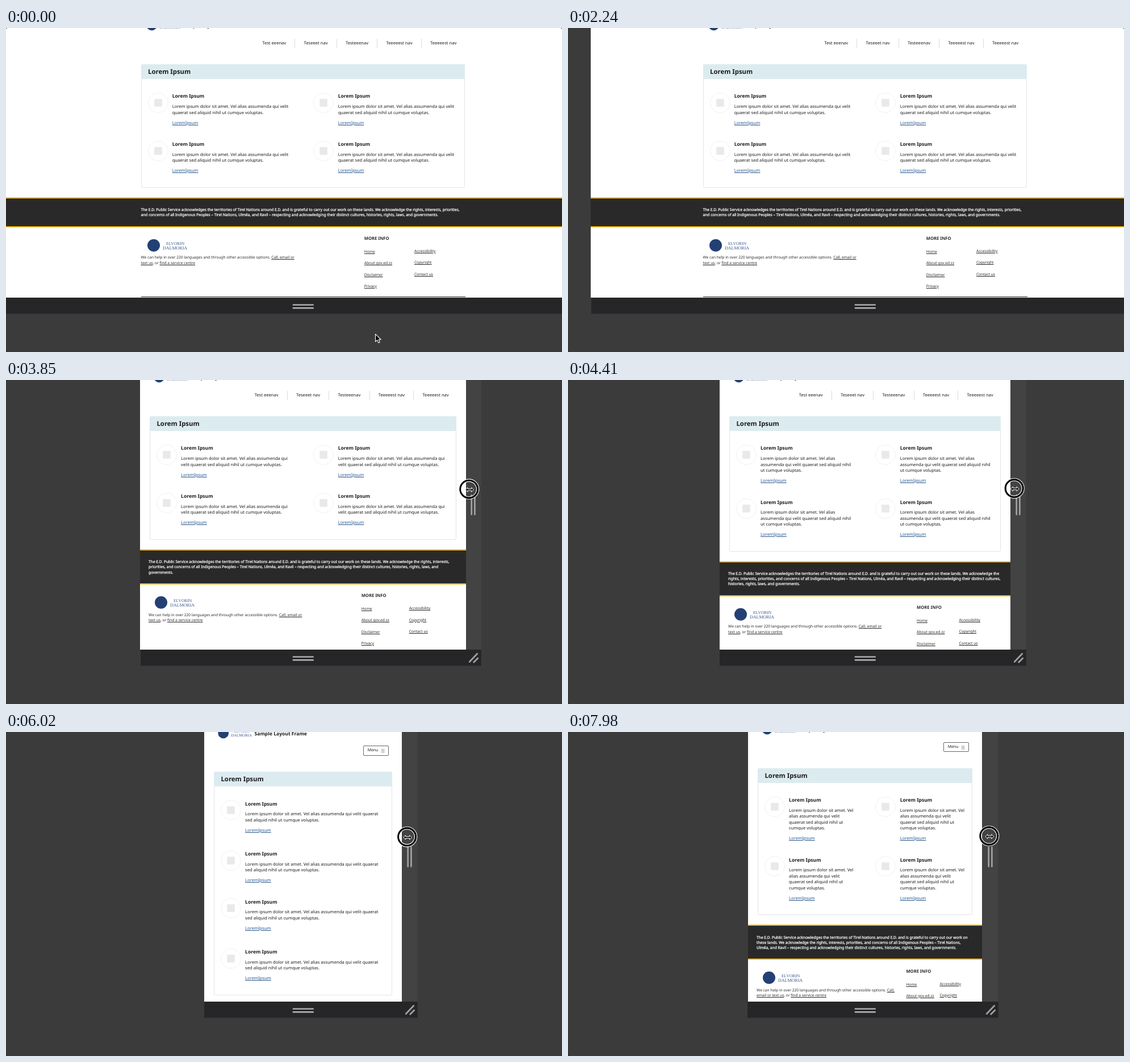
Write an HTML page that moves like this. It is 979x572 px and loops after 8000 ms.

```html
<!DOCTYPE html>
<html lang="en">
<head>
<meta charset="utf-8">
<title>Responsive page</title>
<style>
html, body { margin: 0; width: 100%; height: 100%; overflow: hidden; background: #222; }
* { box-sizing: border-box; }
#stage { position: absolute; left: 0; top: 0; width: 979px; height: 572px; overflow: hidden; background: #3b3b3b;
  border-radius: 3px; font: 7.6px/10.45px "Noto Sans", sans-serif; color: #1c1c1e; text-rendering: geometricPrecision; }
#page { position: absolute; top: 0; height: 476px; overflow: hidden; background: #fff; }
#stage svg { position: absolute; left: 0; top: 0; overflow: visible; }
p, h1, h2, h3 { margin: 0; }
a { text-decoration: underline; }
.in { position: relative; width: calc(2px * var(--i)); margin: 0 auto; }
#head { height: 0; }
#title { position: absolute; left: 73.5px; top: -9.8px; font-size: 8.55px; line-height: 12px; white-space: nowrap; }
#nav { position: absolute; right: 0; top: 18.5px; display: flex; white-space: nowrap; }
#nav span { padding: 0 15.2px; line-height: 17px; border-left: .8px solid #dcdcdc; }
#nav span:first-child { border: 0; }
#menu { position: absolute; right: 8px; top: 17.5px; width: 45.4px; height: 17.6px; padding-left: 7.2px;
  border: .9px solid #666; border-radius: 2px; font-size: 6.9px; line-height: 16px; }
#card { position: relative; width: calc(2px * var(--c)); margin: 0 auto; border: 1px solid #e2e4e5; border-radius: 2.5px;
  padding-bottom: 22.9px; }
#card h1 { margin: -1px -1px 0; height: 26.2px; padding-left: 12px; background: #dcebf0; border-radius: 2.5px 2.5px 0 0;
  font-size: 11.4px; line-height: 28.2px; }
#items { display: grid; grid-template-columns: 1fr 1fr; row-gap: 26px; padding-top: 24.3px; }
.item { position: relative; padding: 0 15.5px 0 53.7px; }
.item:nth-child(even) { padding-left: 61.7px; padding-right: 7.5px; }
.item h3 { font-size: 8.55px; line-height: 12px; margin-bottom: 7.7px; }
.item a { display: block; margin-top: 7.6px; color: #28588f; }
.item svg { margin: 17.7px 0 0 28.5px; }
.item:nth-child(even) svg { margin-left: 36.4px; }
.narrow #items { grid-template-columns: 1fr; }
.narrow .item:nth-child(n) { padding: 0 15.5px 0 53.7px; }
.narrow .item:nth-child(n) svg { margin-left: 28.5px; }
.narrow .item:nth-child(odd) { margin-bottom: 3.8px; }
#ack { margin-top: 17.4px; padding: 15.2px 0; background: #292929; border: solid #fab71c; border-width: 2.1px 0;
  color: #fff; font-size: 6.65px; line-height: 9.14px; -webkit-text-stroke: .25px #fff; }
#foot { font-size: 6.65px; line-height: 9.15px; color: #29292b; }
#help { position: absolute; top: 48.7px; left: 0; width: 66.67%; max-width: 281px; }
#more { position: absolute; top: 15.5px; font-size: 7.6px; line-height: 10px; white-space: nowrap; }
#foot a.l { position: absolute; white-space: nowrap; }
#rule { position: absolute; top: 122px; left: 0; width: 100%; height: 1px; background: #2c2c2c; }
</style>
</head>
<body>
<div id="stage">
  <div id="page">
    <div id="head" class="in">
      <svg width="1" height="1"><g class="logo" transform="translate(0 -5) scale(.85)"></g></svg>
      <h2 id="title">Sample Layout Frame</h2>
      <div id="nav"><span>Test eeenav</span><span>Teseeet nav</span><span>Testeeenav</span><span>Teeeeest nav</span><span>Teeeeest nav</span></div>
      <div id="menu">Menu<svg width="1" height="1"><path d="M30.6 6h6M30.6 8.5h6M30.6 11h6" stroke="#777" stroke-width=".8"/></svg></div>
    </div>
    <div id="card"><h1>Lorem Ipsum</h1><div id="items"></div></div>
    <div id="ack"><p class="in">The E.D. Public Service acknowledges the territories of Tirel Nations around E.D. and is grateful to carry out our work on these lands. We acknowledge the rights, interests, priorities, and concerns of all Indigenous Peoples – Tirel Nations, Ulméa, and Ravil – respecting and acknowledging their distinct cultures, histories, rights, laws, and governments.</p></div>
    <div id="foot" class="in">
      <svg width="1" height="1"><g class="logo" transform="translate(0 31.8)"></g></svg>
      <p id="help">We can help in over 220 languages and through other accessible options. <a>Call, email or text us</a>, or <a>find a service centre</a></p>
      <h3 id="more">MORE INFO</h3>
      <div id="rule"></div>
    </div>
  </div>
  <svg width="979" height="572">
    <rect id="panel" width="28" height="478" fill="#434343"/>
    <rect id="bar" y="476" height="28.5" fill="#262628"/>
    <g fill="#ababab">
      <rect x="504.5" y="487.4" width="37.5" height="2.7" rx="1.3"/>
      <rect x="504.5" y="493.1" width="37.5" height="2.7" rx="1.3"/>
    </g>
    <g id="grip" stroke="#a2a2a2" stroke-width="2.7" stroke-linecap="round">
      <path d="M-17 203.5V237.5M-11.3 203.5V237.5M-20.5 497.5L-7 483.3M-13 498.3L-6 491.3"/>
    </g>
    <g id="ring" fill="none">
      <circle r="17.5" stroke="#fff" stroke-width="1.2"/>
      <circle r="15.4" stroke="#000" stroke-width="3.2"/>
      <circle r="13.3" stroke="#fff" stroke-width="1.1"/>
      <path d="M-6.3 1L-2.4-2.9V-.5H4.4V-2.9L8.3 1L4.4 4.9V2.5H-2.4V4.9Z" fill="#111" stroke="#fff" stroke-linejoin="round"/>
    </g>
    <path id="arrow" d="M650.5 540.3V553.8L653.7 550.9L655.8 555.8L658.2 554.8L656.1 550H660.2Z" fill="#000" stroke="#fff" stroke-width="1.1" stroke-linejoin="round"/>
  </svg>
</div>
<script>
const $ = id => document.getElementById(id);
const MID = 523, LOOP = 8000, STEP = 70;

// [time, left edge of the page]
const edge = [[1400, -4], [1800, 8], [2170, 33], [2600, 75], [2940, 120], [3010, 132], [3400, 190],
  [3850, 236], [4690, 282], [5040, 298], [5530, 316], [5880, 344], [6020, 349], [6300, 353],
  [7210, 353], [7980, 317], [8050, 314]];
// [time, value] for the pointer, x measured from the frame's right side
const ringX = [[2170, -27], [2940, -25], [3850, -21.5], [5040, -20.5], [6020, -18.6], [7980, -16.4]];
const ringY = [[2170, 204.6], [2940, 201.2], [3850, 192.7], [5040, 189.7], [6020, 185.1], [7980, 183.5]];

function at(keys, t) {
  const n = keys.findIndex(k => k[0] > t);
  if (n === 0) return keys[0][1];
  if (n < 0) return keys[keys.length - 1][1];
  const [a, u] = keys[n - 1], [b, v] = keys[n];
  return u + (v - u) * (t - a) / (b - a);
}

for (const g of document.querySelectorAll('.logo')) g.innerHTML =
  `<circle cx="22" r="11" fill="#234075"/>
   <g fill="#3a578c" font-family="Liberation Serif, serif">
   <text x="44" y="-1" font-size="7.5">ELVORIN</text><text x="38" y="7.2" font-size="8">DALMORIA</text></g>`;

$('items').innerHTML = `<div class="item">
  <svg width="1" height="1"><circle r="17.3" fill="none" stroke="#ededed" stroke-width=".8"/>
  <rect x="-6.8" y="-6.8" width="13.6" height="13.6" fill="#e9e9e9"/></svg>
  <h3>Lorem Ipsum</h3>
  <p>Lorem ipsum dolor sit amet. Vel alias assumenda qui velit quaerat sed aliquid nihil ut cumque voluptas.</p>
  <a>LoremIpsum</a></div>`.repeat(4);

const columns = [['Home', 'About gov.ed.zz', 'Disclaimer', 'Privacy'], ['Accessibility', 'Copyright', 'Contact us']];
const links = columns.map((names, c) => names.map((name, r) => {
  const a = document.createElement('a');
  a.className = 'l';
  a.textContent = name;
  a.style.top = 38.3 - c * .9 + r * 20.3 + 'px';
  $('foot').append(a);
  return a;
}));

function draw(t) {
  const left = Math.round(at(edge, t)), half = MID - left;
  const inner = Math.min(285.5, half - 15.1), card = Math.min(285, half - 17.4);
  const narrow = half < 182.4, menu = half < 243;
  const page = $('page');
  page.style.left = left + 'px';
  page.style.width = half * 2 + 'px';
  page.style.setProperty('--i', inner);
  page.style.setProperty('--c', card);
  page.className = narrow ? 'narrow' : '';
  $('head').style.top = (narrow ? 6.6 : 0) + 'px';
  $('nav').style.display = menu ? 'none' : 'flex';
  $('menu').style.display = menu ? 'block' : 'none';
  $('card').style.marginTop = (narrow ? 70.2 : menu ? 63.6 : 64) + 'px';

  const x1 = inner * 1.3737 + 1.1, x2 = inner * 1.682 + 1.2;
  $('more').style.left = x1 + 'px';
  links[0].forEach(a => a.style.left = x1 + 'px');
  links[1].forEach(a => a.style.left = x2 + 'px');

  // the frame runs slightly ahead of the page
  const barLeft = Math.round(at(edge, t + 15)), right = 2 * MID - barLeft + 27.7;
  const pageRight = MID + half;
  $('bar').setAttribute('x', barLeft);
  $('bar').setAttribute('width', right - barLeft);
  $('panel').setAttribute('x', pageRight);
  $('panel').setAttribute('width', Math.max(0, right - pageRight));
  $('grip').setAttribute('transform', `translate(${right})`);
  $('ring').setAttribute('transform', `translate(${right + at(ringX, t)} ${at(ringY, t)})`);
  $('arrow').style.display = t < 140 ? '' : 'none';
}

const start = performance.now();
function tick() {
  const t = (performance.now() - start) % LOOP;
  draw(Math.floor(t / STEP) * STEP);
  requestAnimationFrame(tick);
}
tick();
</script>
</body>
</html>
```
